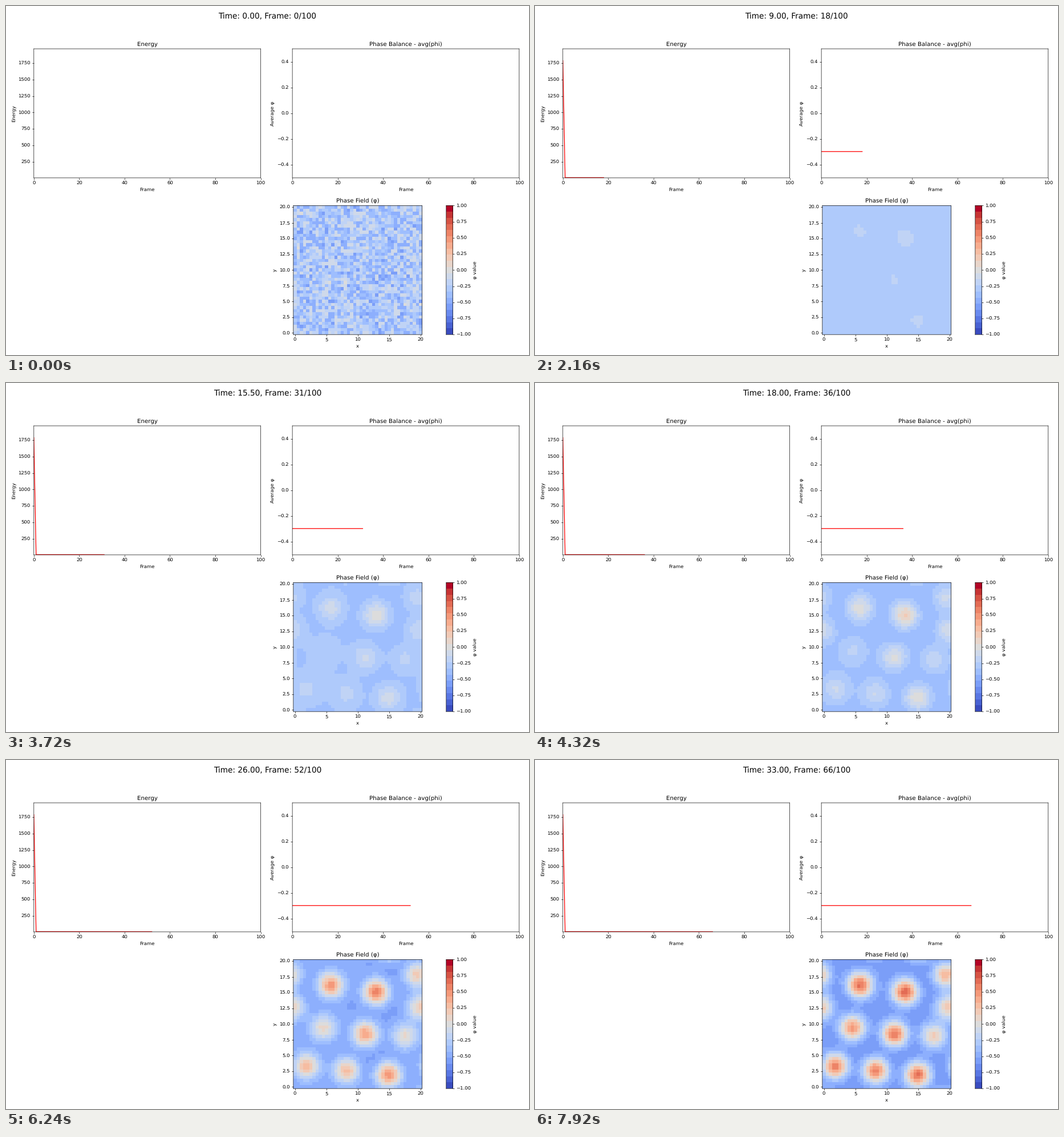
A matplotlib script that plays this animation: 917 by 611 pixels, repeating every 8000 ms.

```python
import numpy as np
import matplotlib.pyplot as plt
from matplotlib.animation import FuncAnimation

W, H, DPI = 917, 611, 61.13
STEP, TICK, LOOP = 120, 40, 8000

plt.rcParams.update({
    "font.family": "DejaVu Sans",
    "text.hinting": "none",
    "path.snap": False,
})

MEAN = -.296
SHADES = dict(cmap=plt.get_cmap("coolwarm", 21), vmin=-1, vmax=1,
              origin="lower", interpolation="nearest", aspect="auto")

# Periodic grid
N, DX = 41, 0.5
SPAN = N * DX
X, Y = np.meshgrid(np.arange(N) * DX, np.arange(N) * DX)

# x, y, strength, frame of fastest growth
DROPS = [
    (12.9, 15.1, 1, 38), (5.7, 16.2, 1, 43), (14.9, 1.9, 1, 42),
    (11.2, 8.4, 1, 44), (8.2, 2.6, 1, 49), (1.8, 3.3, 1, 49),
    (4.5, 9.4, 1, 54), (19.4, 17.8, .75, 44), (19.9, 12.7, .65, 40),
    (17.5, 8.1, .6, 44),
]


def hat(cx, cy, sigma=1.45):
    """Bump with a hollow ring around it, which keeps the mean unchanged."""
    dx = (X - cx + SPAN / 2) % SPAN - SPAN / 2
    dy = (Y - cy + SPAN / 2) % SPAN - SPAN / 2
    q = (dx ** 2 + dy ** 2) / (2 * sigma ** 2)
    return np.exp(-q) - np.exp(-q / 4) / 4


def field(n):
    if n == 0:
        return MEAN + np.random.default_rng(42).uniform(-.25, .25, (N, N))
    phi = np.zeros((N, N))
    for x, y, strength, peak in DROPS:
        growth = 1.45 / (1 + np.exp((peak - n) / 8))
        fading = .2 * np.exp(-n / 12)
        phi += strength * (growth + fading) * hat(x, y)
    return phi - phi.mean() + MEAN


def panel(left, top, right, bottom, title="", xlabel="", ylabel=""):
    ax = fig.add_axes([left / W, 1 - bottom / H,
                       (right - left) / W, (bottom - top) / H])
    ax.set_title(title)
    ax.set_xlabel(xlabel)
    ax.set_ylabel(ylabel)
    return ax


fig = plt.figure(figsize=((W + .01) / DPI, (H + .01) / DPI), dpi=DPI,
                 facecolor="white")
heading = fig.suptitle("", fontsize=16)

energy_ax = panel(48.8, 75, 446.5, 300.9, "Energy", "Frame", "Energy")
energy_ax.set(xlim=(0, 100), ylim=(6, 1967), yticks=range(250, 1751, 250))
energy_line, = energy_ax.plot([], [], "r-", lw=1.5)

mean_ax = panel(502.1, 75, 899.8, 300.9, "Phase Balance - avg(phi)",
                "Frame", "Average φ")
mean_ax.set(xlim=(0, 100), ylim=(-.5, .5), yticks=np.linspace(-.4, .4, 5))
mean_line, = mean_ax.plot([], [], "r-", lw=1.5)

field_ax = panel(503.8, 349.5, 729.4, 575.2, "Phase Field (φ)", "x", "y")
edge = (-DX / 2, SPAN - DX / 2)
image = field_ax.imshow(field(0), extent=edge + edge, **SHADES)
field_ax.set(xticks=range(0, 21, 5), yticks=np.arange(0, 20.1, 2.5))

bar_ax = panel(771.8, 349.5, 783.2, 575.2)
bar_ax.imshow(np.linspace(-1, 1, 452)[:, None], extent=(0, 1, -1, 1), **SHADES)
bar_ax.set(xticks=[], yticks=np.linspace(-1, 1, 9))
bar_ax.yaxis.tick_right()
bar_ax.yaxis.set_label_position("right")
bar_ax.set_ylabel("φ value")

FRAMES = np.arange(LOOP // STEP + 1)
ENERGY = np.where(FRAMES == 0, 1788, 10 - FRAMES * .03)
FIELDS = [field(n) for n in FRAMES]


def update(i):
    n = i * TICK // STEP
    heading.set_text(f"Time: {n * .5:.2f}, Frame: {n}/100")
    energy_line.set_data(FRAMES[:n + 1], ENERGY[:n + 1])
    mean_line.set_data(FRAMES[:n + 1], np.full(n + 1, MEAN))
    image.set_data(FIELDS[n])
    return heading, energy_line, mean_line, image


anim = FuncAnimation(fig, update, frames=LOOP // TICK, interval=TICK,
                     init_func=lambda: update(0), repeat=True, repeat_delay=0)
plt.show()
```
